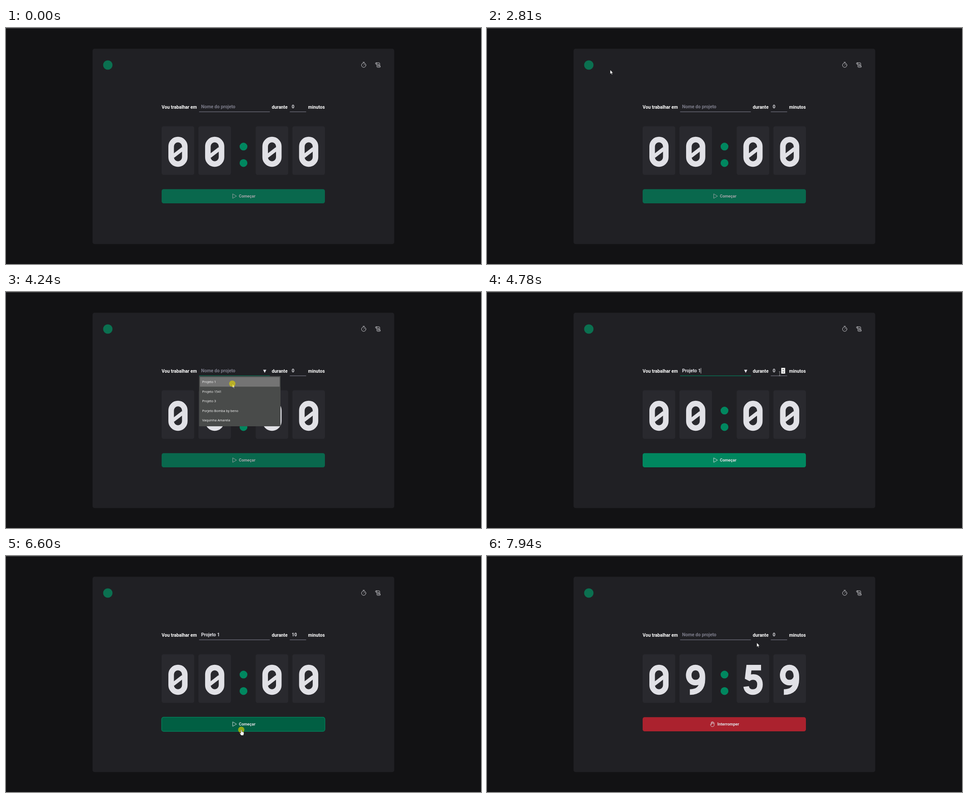
Animation, 1059 px wide and 529 px high, one loop 8 s. Source, as an HTML page:

```html
<!DOCTYPE html>
<html lang="pt-BR">
<head>
<meta charset="utf-8">
<title>Timer</title>
<style>
  html, body { margin: 0; width: 100%; height: 100%; overflow: hidden; background: #121214; }
  svg { display: block; width: 100vw; height: 100vh; }
  text { font: 700 10.21px Roboto, sans-serif; fill: #e1e1e6; }
  .label { fill: #fff; }
  #action text { font-size: 9.08px; }
  #list text { font: 400 7.3px "Open Sans", "Noto Sans", sans-serif; fill: #fff; }
  .icon { fill: none; stroke: #e1e1e6; stroke-width: .9; stroke-linecap: round; stroke-linejoin: round; }
  .digit { fill: none; stroke: #e1e1e6; stroke-width: 12.4; stroke-miterlimit: 2; }
  .pointer { fill: #fff; stroke: #161616; stroke-width: .5; }
</style>
</head>
<body>
<svg viewBox="0 0 1059 529" preserveAspectRatio="none">
  <defs>
    <g id="d0">
      <path d="M-15.2 21.5a15.2 15.5 0 0 1 30.4 0v24a15.2 15.5 0 0 1-30.4 0z"/>
      <path d="M-11 43.5L11 26.5" stroke-width="8.5" style="stroke-width:8.5"/>
    </g>
    <path id="d1" d="M4.8 67V.5M-18 16L6 7.5"/>
    <path id="d5" d="M18 6.2H-9L-12 32C-8 28-4 27 1 27.2C11 27.4 15.6 34 15.6 44C15.6 54 10 61 0 61C-9 61-14.2 56-15.2 48.5"/>
    <path id="d9" d="M14.8 28C12 37 6 40-1.5 39.8S-15.6 33-15.6 23.5S-10 6-.8 6S15 13 15 27V32C15 51 6 61-13 61"/>
  </defs>

  <rect width="1059" height="529" fill="#121214"/>
  <rect width="1059" height="1" fill="#4b4b4d"/>
  <rect x="193" y="46.5" width="672.5" height="437.7" rx="4.5" fill="#202024"/>
  <circle cx="227" cy="83" r="10.5" fill="#0b7050"/>

  <g class="icon">
    <circle cx="797.5" cy="83.3" r="4.9"/>
    <path d="M797.5 83.3l2.2-2.2M795.9 76.7h3.2"/>
    <path d="M826.8 81h-2.5q-1.6-3 1-3.1h6.2q1.7 0 1.7 1.8v5.4M825.3 77.9q1.6 0 1.6 1.8v6.6q0 1.8 1.7 1.8h4.7q2 0 1-2.8h-5.7M829 81.3h2.4M829 83.3h2.4"/>
  </g>

  <text class="label" x="347" y="180.5">Vou trabalhar em</text>
  <text class="label" x="592.6" y="180.5">durante</text>
  <text class="label" x="673.5" y="180.5">minutos</text>
  <text id="project" x="435" y="180"></text>
  <text id="minutes" x="637" y="180"></text>
  <rect id="line1" x="430.5" y="187.3" width="157.7" height="1.1"/>
  <rect id="line2" x="632.7" y="187.3" width="36.5" height="1.1"/>
  <rect id="caret" y="170.3" width=".9" height="12.4" fill="#e1e1e6"/>
  <path id="arrow" d="M573.2 174.2h7.2l-3.6 7z" fill="#e1e1e6"/>
  <g id="spinner">
    <rect x="656" y="170" width="8.7" height="13" fill="#f1f1f1"/>
    <path d="M658.5 174.8h3.8l-1.9-2.2zM658.5 178.6h3.8l-1.9 2.2z" fill="#404040"/>
  </g>

  <g id="digits" role="img"></g>
  <g fill="#00875f"><circle cx="529.5" cy="265.8" r="8.7"/><circle cx="529.5" cy="302.7" r="8.7"/></g>

  <g id="action">
    <rect id="button" x="347" y="361.3" width="364" height="31.8" rx="4.5" stroke-width="1.2"/>
    <g id="start">
      <path class="icon" d="M505.4 372.2v9.6l8.2-4.8z"/>
      <text x="519.2" y="380.3">Começar</text>
    </g>
    <g id="stop">
      <path class="icon" d="M500.2 376.4v-3.6a1 1 0 0 1 2.1 0v3M502.3 373v-.6a1 1 0 0 1 2.1 0v4M504.4 374.4a1 1 0 0 1 2.2 0v3.8q0 4.3-4.3 4.3c-2.3 0-3-1.4-4.3-4.4q.4-1.9 1.8-1l.4 1v-4.3"/>
      <text x="513.5" y="380.3">Interromper</text>
    </g>
  </g>

  <g id="list">
    <rect x="430.5" y="188.5" width="181.5" height="112.5" fill="#494b4a"/>
    <rect id="row" x="432.5" width="177.5" height="21.6" fill="#747474"/>
  </g>

  <path id="default" class="pointer" d="M0 0V9.3L2.1 7.3L3.5 10.5L4.9 9.9L3.5 6.8H6.3Z"/>
  <path id="text" d="M-1.8-4.5H1.8M0-4.5V4.5M-1.8 4.5H1.8" fill="none" stroke="#a9a9ac" stroke-width=".8"/>
  <circle id="click" r="7" fill="#ddd000" fill-opacity=".65"/>
  <path id="hand" class="pointer" d="M-1 1Q0-.6 1 1V4.2L5 5.2Q5.8 5.4 5.8 6.4V9L4.8 12.6H-.2L-3.3 8.2Q-3.4 6.6-2 7L-1 8Z"/>
</svg>

<script>
const LOOP = 8000, STEP = 70;
const GREEN = '#00875f', GRAY = '#7c7c8a';
const CARDS = [347, 428.9, 556.6, 638.4];
const ITEMS = ['Projeto 1', 'Projeto 1541', 'Projeto 3', 'Porjeto Bomba by beno', 'Vaquinha Amarela'];
const $ = id => document.getElementById(id);

// Each move bends from the previous end towards `via` and stops at `to`.
const MOVES = [
  { start: 180, end: 310, to: [780, 439] },
  { start: 510, end: 650, to: [705, 411] },
  { start: 850, end: 1610, to: [267, 87], via: [269, 79] },
  { start: 2080, end: 2080, to: [268, 86] },
  { start: 2810, end: 3570, to: [467, 176], via: [440, 290] },
  { start: 3640, end: 4240, to: [504.5, 205.5], via: [470, 174] },
  { start: 4380, end: 5120, to: [658.5, 173], via: [692, 185] },
  { start: 6200, end: 6470, to: [524.5, 389.5] },
  { start: 7060, end: 7400, to: [800, 425], via: [680, 465] },
  { start: 7470, end: 7850, to: [639, 225], via: [825, 255] },
  { start: 7940, end: 7940, to: [601.5, 194.5] },
];
const CLICKS = [[3640, 3715], [4240, 4380], [5120, 5190], [5870, 5920], [6600, 6730]];

const within = (t, [from, to]) => t >= from && t < to;
const inBox = ([x, y], x0, y0, x1, y1) => x >= x0 && x <= x1 && y >= y0 && y <= y1;
const show = (id, on) => $(id).setAttribute('visibility', on ? 'visible' : 'hidden');

function pointerAt(t) {
  let from = [905, 530];
  let pos = [-50, -50];
  for (const { start, end, to, via } of MOVES) {
    if (t < start) break;
    const gaps = Math.round((end - start) / STEP);
    const done = gaps ? Math.min(gaps, Math.round((t - start) / (end - start) * gaps)) : 0;
    const u = (done + 1) / (gaps + 1);
    const s = u * u * (3 - 2 * u);
    const bend = via || from.map((v, i) => (v + to[i]) / 2);
    pos = from.map((v, i) => (1 - s) ** 2 * v + 2 * s * (1 - s) * bend[i] + s * s * to[i]);
    from = to;
  }
  return pos;
}

function add(parent, tag, attrs) {
  const node = document.createElementNS(parent.namespaceURI, tag);
  for (const name in attrs) node.setAttribute(name, attrs[name]);
  return parent.appendChild(node);
}

const digits = CARDS.map(x => {
  add($('digits'), 'rect', { x, y: 220.3, width: 72.6, height: 109, rx: 4.5, fill: '#29292e' });
  return add($('digits'), 'use', { x: x + 36.4, y: 244, class: 'digit' });
});
ITEMS.forEach((name, i) => {
  add($('list'), 'text', { x: 437.5, y: 204 + 21.6 * i }).textContent = name;
});

function drawForm(t, pos) {
  const chosen = within(t, [4380, 6730]);
  const focus1 = within(t, [3640, 5120]);
  const focus2 = within(t, [5120, 6600]);
  const listOpen = within(t, [3715, 4380]);
  const over1 = !listOpen && inBox(pos, 430, 166, 588, 188);
  const over2 = inBox(pos, 633, 166, 669, 188);

  $('project').textContent = chosen ? 'Projeto 1' : 'Nome do projeto';
  $('project').style.fill = chosen ? '#e1e1e6' : GRAY;
  $('minutes').textContent = !within(t, [5120, 6730]) ? '0' : t < 5870 ? '5' : '10';
  $('line1').setAttribute('fill', focus1 ? GREEN : GRAY);
  $('line2').setAttribute('fill', focus2 ? GREEN : GRAY);
  show('arrow', focus1 || over1);
  show('spinner', focus2 || over2);

  const blink = (t - (chosen ? 4380 : 3640)) % 1000 < 500;
  show('caret', focus1 && blink);
  $('caret').setAttribute('x', chosen ? 476.5 : 434.7);

  const row = Math.floor((pos[1] - 190.6) / 21.6);
  show('list', listOpen);
  show('row', listOpen && row >= 0);
  $('row').setAttribute('y', 190.6 + 21.6 * Math.max(row, 0));
  return over1 || (over2 && pos[0] < 656);
}

function drawTimer(t, hover) {
  const running = t >= 6730;
  const time = !running ? '0000' : t < 7710 ? '1000' : '0959';
  digits.forEach((d, i) => d.setAttribute('href', '#d' + time[i]));
  $('digits').setAttribute('aria-label', time.slice(0, 2) + ':' + time.slice(2));

  const idle = running ? '#ab222e' : GREEN;
  const dark = running ? '#7a1921' : '#015f43';
  $('button').setAttribute('fill', hover ? dark : idle);
  $('button').setAttribute('stroke', within(t, [6600, 6730]) ? GREEN : 'none');
  $('action').setAttribute('opacity', t < 4380 ? .7 : 1);
  show('start', !running);
  show('stop', running);
}

function render(t) {
  const pos = pointerAt(t);
  const onButton = t >= 4380 && inBox(pos, 347, 361, 711, 393);
  const onText = drawForm(t, pos);
  drawTimer(t, onButton);

  const kind = onButton ? 'hand' : onText ? 'text' : 'default';
  for (const id of ['default', 'text', 'hand', 'click']) {
    show(id, id === kind || (id === 'click' && CLICKS.some(c => within(t, c))));
    $(id).setAttribute('transform', `translate(${pos})`);
  }
}

const began = performance.now();
function tick() {
  render((performance.now() - began) % LOOP);
  requestAnimationFrame(tick);
}
tick();
</script>
</body>
</html>
```
